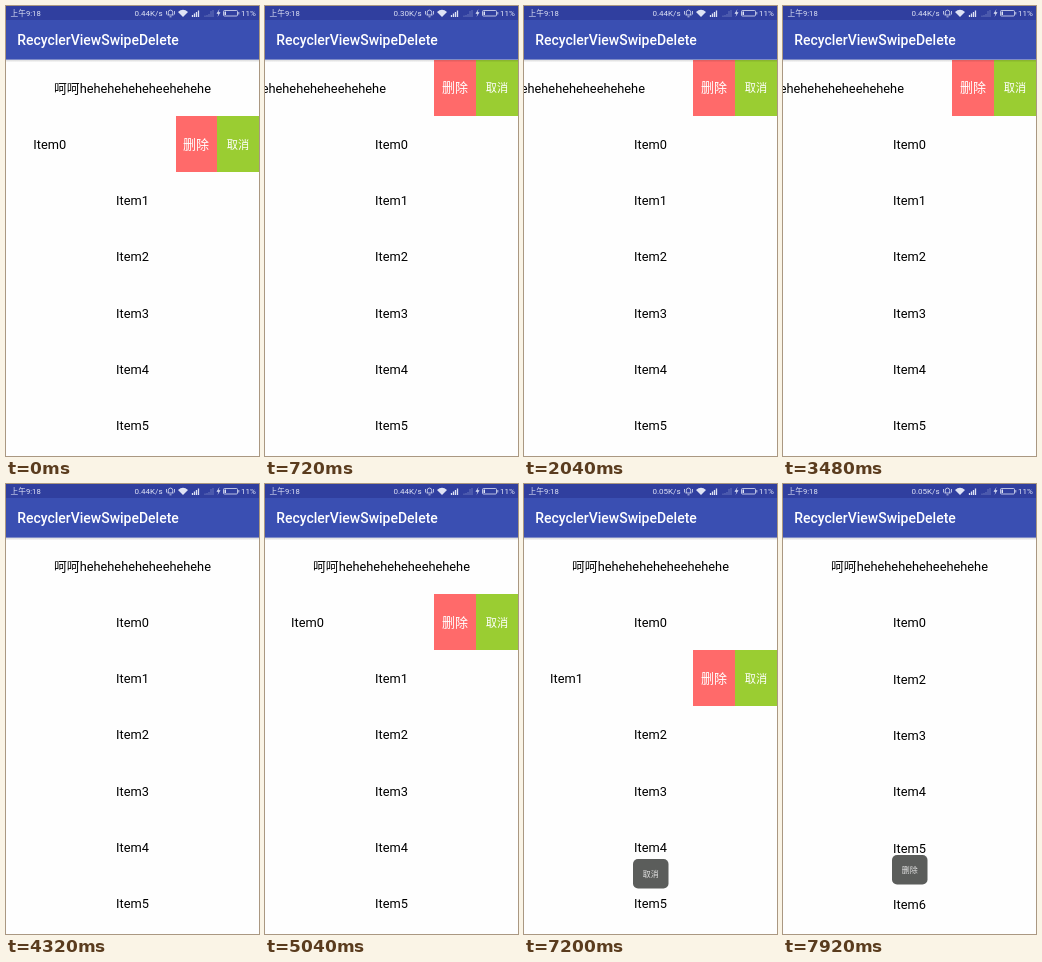
Animation, 253 px wide and 450 px high, one loop 8 s. Source, as an HTML page:

```html
<!DOCTYPE html>
<html lang="zh">
<head>
<meta charset="utf-8">
<title>Swipe to delete</title>
<style>
html, body { margin: 0; width: 100%; height: 100%; overflow: hidden; background: #fefefe; }
svg { display: block; width: 100vw; height: 100vh; }
text { font-family: Roboto, "Noto Sans CJK SC", "Noto Sans CJK", sans-serif; fill: #fff; }
rect.flat { shape-rendering: crispEdges; }
.label { font-size: 12.8px; text-anchor: middle; fill: #000; }
.button { text-anchor: middle; }
.status { font-size: 8px; fill: #dfe3f5; }
.toast { font-size: 8px; text-anchor: middle; fill: #e4e4e4; }
</style>
</head>
<body>
<svg id="stage" viewBox="0 0 253 450">
  <defs>
    <linearGradient id="shade" x2="0" y2="1">
      <stop stop-color="#000" stop-opacity=".16"/>
      <stop offset="1" stop-color="#000" stop-opacity="0"/>
    </linearGradient>
  </defs>
  <rect class="flat" width="253" height="450" fill="#fefefe"/>
  <g id="list"></g>
  <rect y="53.500" width="253" height="3" fill="url(#shade)"/>
  <rect y="14" width="253" height="39.600" fill="#3a4fb2"/>
  <rect class="flat" width="253" height="14" fill="#303f9f"/>
  <text x="11.2" y="39" font-size="13.98" font-weight="500">RecyclerViewSwipeDelete</text>

  <text class="status" x="4.5" y="10" font-size="7.7" style="font-size:7.7px">上午9:18</text>
  <text class="status" id="speed" x="128.5" y="10"></text>
  <g fill="none" stroke="#dfe3f5" stroke-width=".8">
    <path d="M161.500 9h6M162.300 9V6.300a2.200 2.200 0 0 1 4.400 0V9M160.500 5v3.500M168.500 5v3.500M163.500 10.800h2"/>
    <path d="M186.500 11V9M188.500 11V7.500M190.500 11V6M192.500 11V4.500" stroke-width="1.300"/>
    <path d="M199 11V9.500M201 11V9M203 11V8M205 11V5M207 11V4" opacity=".4"/>
    <rect x="217.500" y="4.500" width="14" height="5.500" rx="1"/>
    <path d="M232.800 6v2.500"/>
  </g>
  <path d="M172 6q5-4.400 10 0L177 11z" fill="#dfe3f5"/>
  <path d="M213.500 3l-3 4.700h2l-1 3.300 3-4.700h-2z" fill="#dfe3f5"/>
  <rect x="218.500" y="5.500" width="1.500" height="3.500" fill="#dfe3f5"/>
  <text class="status" x="235" y="10">11%</text>
  <g id="toasts"></g>
</svg>
<script>
const LOOP = 8000, STEP = 120;
const ROW_TOP = 53.5, ROW_HEIGHT = 56.25, OPEN = 84;
const REMOVED_ROW = 2;
const byId = id => document.getElementById(id);

// Swipe distance of each row as [time, pixels]
const swipes = [
  [[240, 0], [660, OPEN], [3480, OPEN], [3900, 0]],
  [[0, 82.8], [360, 0], [4440, 0], [4920, OPEN], [5400, OPEN], [5760, 0]],
  [[6120, 0], [6625, OPEN]]
];
const speeds = [[0, "0.44K/s"], [360, "0.30K/s"], [1800, "0.44K/s"], [7080, "0.05K/s"]];

function make(parent, tag, attrs, text = "") {
  const node = document.createElementNS("http://www.w3.org/2000/svg", tag);
  for (const key in attrs) node.setAttribute(key, attrs[key]);
  node.textContent = text;
  return parent.appendChild(node);
}

function ease(t, start, end) {
  const p = Math.min(1, Math.max(0, (t - start) / (end - start)));
  return p * p * (3 - 2 * p);
}

function sample(keys, t) {
  let value = keys[0][1];
  for (let i = 1; i < keys.length; i++) {
    const [start, from] = keys[i - 1], [end, to] = keys[i];
    if (t >= start) value = from + (to - from) * ease(t, start, end);
  }
  return value;
}

function makeButton(parent, x, width, fill, size, label) {
  make(parent, "rect", { class: "flat", x, width, height: ROW_HEIGHT, fill });
  make(parent, "text", { class: "button", x: x + 21, y: 32.8, "font-size": size }, label);
}

function makeRow(label, index) {
  const group = make(byId("list"), "g", {});
  const buttons = make(group, "g", {});
  makeButton(buttons, 169, 42, "#ff6a6a", 13, "删除");
  makeButton(buttons, 211, 42, "#9acd32", 11.25, "取消");
  const cover = make(group, "g", {});
  make(cover, "rect", { class: "flat", width: 253, height: ROW_HEIGHT, fill: "#fefefe" });
  make(cover, "text", { class: "label", x: 126.5, y: 33 }, label);
  return { group, buttons, cover, keys: swipes[index] || [[0, 0]] };
}

function makeToast(label, y) {
  const group = make(byId("toasts"), "g", { transform: `translate(109 ${y})` });
  make(group, "rect", { width: 35.5, height: 29.5, rx: 5, fill: "#5b5d5b" });
  make(group, "text", { class: "toast", x: 17.7, y: 17.8 }, label);
  return group;
}

const labels = ["呵呵heheheheheheehehehe", ...Array.from({ length: 7 }, (_, i) => "Item" + i)];
const rows = labels.map(makeRow);
const cancelToast = makeToast("取消", 375);
const deleteToast = makeToast("删除", 371);

function render(t) {
  const lift = ROW_HEIGHT * ease(t, 7680, 7940);
  rows.forEach(({ group, buttons, cover, keys }, i) => {
    const swipe = sample(keys, t);
    const y = ROW_TOP + i * ROW_HEIGHT - (i > REMOVED_ROW ? lift : 0);
    group.setAttribute("transform", `translate(0 ${y})`);
    cover.setAttribute("transform", `translate(${-swipe} 0)`);
    buttons.setAttribute("display", swipe > 0 ? "inline" : "none");
  });
  rows[REMOVED_ROW].group.setAttribute("opacity", 1 - ease(t, 7500, 7680));
  cancelToast.setAttribute("opacity", ease(t, 5400, 5760) - ease(t, 7440, 7680));
  deleteToast.setAttribute("opacity", ease(t, 7560, 7860));
  byId("speed").textContent = speeds.filter(([start]) => t >= start).pop()[1];
}

const began = performance.now();
function tick() {
  const t = (performance.now() - began) % LOOP;
  render(Math.floor(t / STEP) * STEP);
  requestAnimationFrame(tick);
}
tick();
</script>
</body>
</html>
```
